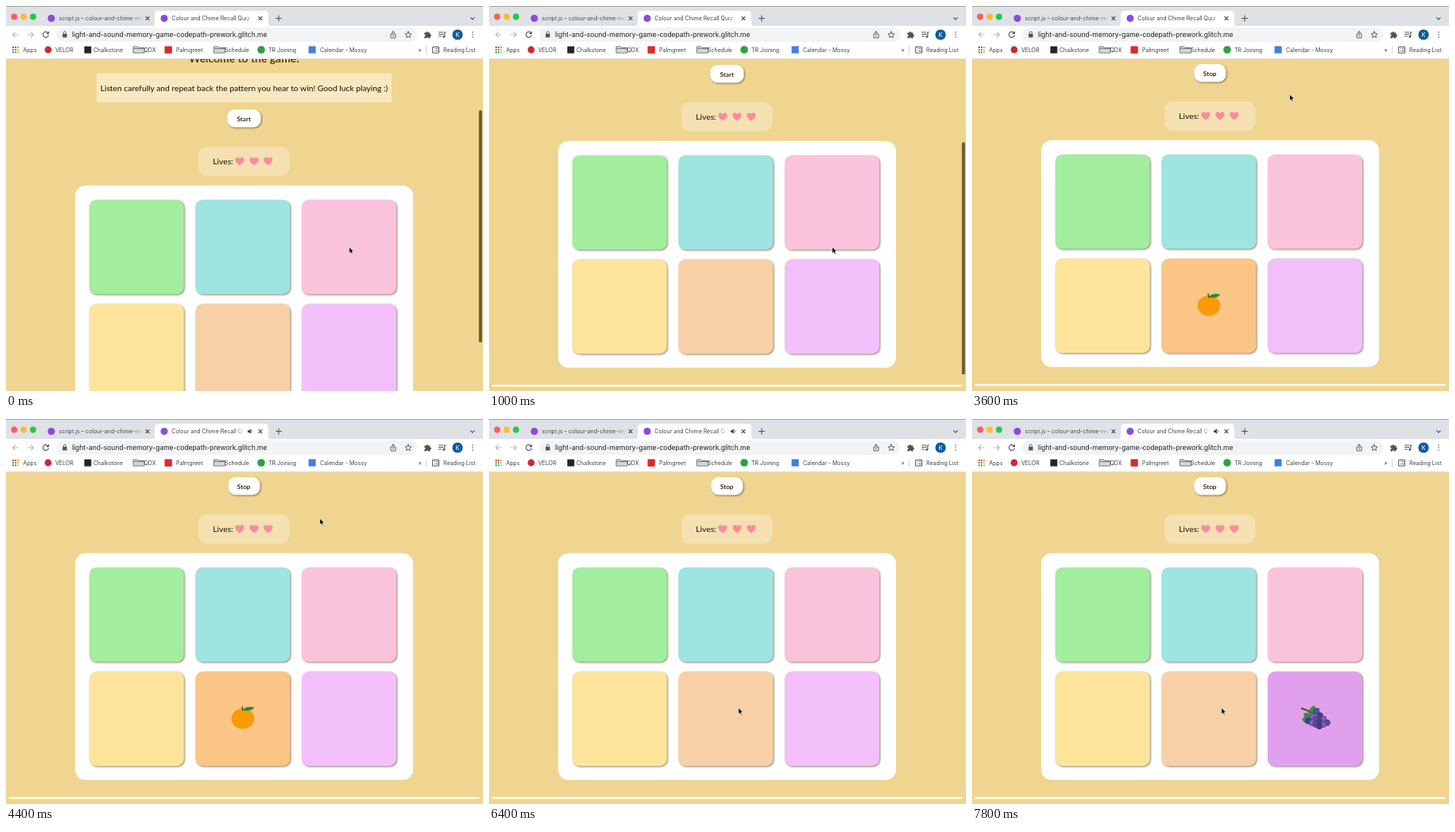
Animation of 600 by 484 pixels, one loop 8000 ms. Source, as an HTML page:

```html
<!DOCTYPE html>
<html lang="en">
<head>
<meta charset="utf-8">
<title>Memory game</title>
<style>
  html, body { margin: 0; width: 100%; height: 100%; overflow: hidden; }
  svg { display: block; width: 100vw; height: 100vh; }
  text { font: 7px Inter, sans-serif; fill: #3c4043; }
  .page text { font: 10.3px Lato, sans-serif; fill: #151007; }
  .page .title { font-size: 13.9px; font-weight: 700; fill: #5e3a10; }
  .page .label { font-size: 8.2px; font-weight: 700; fill: #432a0a; }
  .mid { text-anchor: middle; }
  .raised { filter: drop-shadow(1px 1px 1px rgba(70, 50, 10, .6)); }
  .line { fill: none; stroke: #50545a; stroke-width: 1.1; stroke-linecap: round; stroke-linejoin: round; }
  .faint { stroke: #b9bbbe; }
</style>
</head>
<body>
<svg viewBox="0 0 600 484" preserveAspectRatio="none">
  <defs>
    <linearGradient id="fadeLeft" gradientUnits="userSpaceOnUse" x1="158" x2="173">
      <stop stop-color="#45494d"/><stop offset="1" stop-color="#45494d" stop-opacity="0"/>
    </linearGradient>
    <linearGradient id="fadeRight" gradientUnits="userSpaceOnUse" x1="299" x2="314">
      <stop stop-color="#3c4043"/><stop offset="1" stop-color="#3c4043" stop-opacity="0"/>
    </linearGradient>
    <path id="heart" d="M0 5.3C-3 3-5.6 1-5.6-1.9C-5.6-5.4-1.2-6 0-2.9C1.2-6 5.6-5.4 5.6-1.9C5.6 1 3 3 0 5.3Z" fill="#fb8a9f"/>
    <path id="cross" class="line" d="M-2-2L2 2M2-2L-2 2"/>
    <path id="folder" d="M-7-4h5l1.5 1.5H7V4H-7ZM-7-1.4H7" fill="#d5d7da" stroke="#777b80" stroke-width="1" stroke-linejoin="round"/>
  </defs>

  <rect width="600" height="484" fill="#f0d590"/>

  <g class="page" id="page">
    <text class="title mid" x="299.5" y="14">Welcome to the game!</text>
    <rect x="114" y="27.5" width="371" height="36.5" fill="#f8e8bf"/>
    <text class="mid" x="299.5" y="49.5">Listen carefully and repeat back the pattern you hear to win! Good luck playing :)</text>
    <rect class="raised" id="button" y="73" height="22.5" rx="9" fill="#fff"/>
    <text class="label mid" id="buttonLabel" x="299.2" y="87.5"></text>
    <rect x="242" y="119.7" width="114.5" height="37" rx="11" fill="#f4e0b0"/>
    <text x="260.3" y="141.7">Lives:</text>
    <use href="#heart" x="294" y="138.2"/>
    <use href="#heart" x="312" y="138.2"/>
    <use href="#heart" x="329.8" y="138.2"/>
    <rect x="87" y="168.7" width="425" height="285" rx="13" fill="#fefefe"/>
    <g id="tiles"></g>
    <g id="orange">
      <ellipse cx="298" cy="376.7" rx="14.3" ry="12.9" fill="#f99a06"/>
      <path d="M298 367L297 361.5" stroke="#4c4a18" stroke-width="1.4"/>
      <path d="M298 366Q301 360 312.5 362.5Q308 369 298 366Z" fill="#2f9a3c"/>
      <path d="M299 365.6L310 363" stroke="#1c5e27" stroke-width=".7"/>
    </g>
    <g id="grapes">
      <path d="M414 363.5L423 367L430 372" fill="none" stroke="#6b4424" stroke-width="2"/>
      <path d="M424 366L427 362L430 360L433 363L438 364L435 370L428 371Z" fill="#2f9140"/>
      <path d="M424 369L417 370L418 374L415 378L420 383L427 378Z" fill="#2f9140"/>
    </g>
    <rect x="3.5" y="475.2" width="592" height="2.2" rx="1" fill="#fff"/>
  </g>

  <rect id="scrollbar" x="594.8" width="4" height="292" rx="2" fill="#6b5a38"/>

  <g id="tabs">
    <rect width="600" height="26" fill="#dee1e6"/>
    <rect width="600" height="1" fill="#a9a39c"/>
    <circle cx="10.3" cy="13.5" r="3.9" fill="#fe5f57"/>
    <circle cx="22.2" cy="13.5" r="3.9" fill="#febc2e"/>
    <circle cx="34" cy="13.5" r="3.9" fill="#28c840"/>
    <circle cx="57" cy="15.5" r="4.5" fill="#8b4be0"/>
    <text x="66.5" y="18" style="fill:url(#fadeLeft)">script.js – colour-and-chime-rec</text>
    <use href="#cross" x="178" y="15.5"/>
    <path d="M182 26Q187 26 187 21V11Q187 6 192 6H325Q330 6 330 11V21Q330 26 335 26Z" fill="#fff"/>
    <circle cx="199" cy="15.5" r="4.5" fill="#8b4be0"/>
    <text id="tabTitle" x="208.3" y="18" style="fill:url(#fadeRight)">Colour and Chime Recall Quiz</text>
    <g id="audio">
      <rect x="299" y="9" width="14" height="13" fill="#fff"/>
      <path d="M304 14.2h1.7l2.2-2v6.6l-2.2-2H304Z" fill="#3c4043"/>
      <path class="line" style="stroke-width:.8" d="M309 13.8Q310.3 15.5 309 17.2"/>
    </g>
    <use href="#cross" x="320" y="15.5"/>
    <path class="line" d="M343 12v7M339.5 15.5h7M584.5 14.7l2.3 2.3l2.3-2.3"/>
  </g>

  <g id="toolbar">
    <rect y="25" width="600" height="41.3" fill="#fff"/>
    <rect y="65.8" width="600" height=".8" fill="#e0dccf"/>
    <path class="line faint" d="M15.5 36h-7M11.5 33L8.5 36L11.5 39M27.5 36h7M31.5 33L34.5 36L31.5 39"/>
    <path class="line" d="M53 34A3.5 3.5 0 1 0 53.4 37M53.6 32.3V34.6H51.2"/>
    <rect x="63" y="27.3" width="454.5" height="17.6" rx="8.8" fill="#f1f3f4"/>
    <rect x="71.2" y="35" width="5.4" height="4.5" rx=".6" fill="#50545a"/>
    <path class="line" style="stroke-width:.9" d="M72.4 35V33.6A1.5 1.5 0 0 1 75.4 33.6V35"/>
    <text x="83" y="39.2" style="font-size:8.5px;fill:#202124">light-and-sound-memory-game-codepath-prework.glitch.me</text>
    <path class="line" style="stroke-width:.9" d="M485.5 35H484V40H490V35H488.5M487 38V32M485.3 33.5L487 31.8L488.7 33.5"/>
    <path id="star" class="line" style="stroke-width:.9"/>
    <path d="M526.3 33.6h2.2a1.4 1.4 0 0 1 2.8 0h2.2v2.2a1.4 1.4 0 0 1 0 2.8v2h-2.4a1.2 1.2 0 0 0-2.4 0h-2.4v-2.4a1.2 1.2 0 0 0 0-2.4Z" fill="#50545a"/>
    <path class="line" d="M544.5 33h5.5M544.5 35.5h5.5M544.5 38h3M551.8 38.5V33h1.5"/>
    <circle cx="550.7" cy="38.6" r="1.4" fill="#50545a"/>
    <circle cx="568" cy="36" r="6.6" fill="#0b5c9e"/>
    <text class="mid" x="568" y="38.7" style="fill:#fff;font-size:7.4px">K</text>
    <path d="M587 33v.01M587 36v.01M587 39v.01" class="line" style="stroke-width:1.6"/>
  </g>

  <g id="bookmarks">
    <g id="appDots"></g>
    <circle cx="53" cy="55" r="4.4" fill="#d32732"/>
    <rect x="98.5" y="50.7" width="8.8" height="8.8" fill="#252525"/>
    <use href="#folder" x="167" y="55"/>
    <rect x="199.5" y="50.5" width="9.3" height="9.3" rx="1" fill="#d92b2b"/>
    <use href="#folder" x="268.5" y="55"/>
    <circle cx="321" cy="55" r="4.8" fill="#2fa043"/>
    <rect x="380.6" y="50.5" width="9" height="9" fill="#3f7fe8"/>
    <path d="M528.5 50v10" stroke="#d4d6d9"/>
    <path class="line" d="M537 51.5h7.5v7.5H537ZM539 53.7h.1M541 53.7h2M539 56.5h.1M541 56.5h2" style="stroke-width:1"/>
  </g>

  <path id="cursor" d="M0 0V8.1L1.9 6.4L3.2 9.3L4.6 8.7L3.4 5.8H5.9Z" fill="#000" stroke="#fff" stroke-width=".7"/>
</svg>

<script>
const LOOP = 8000, STEP = 200;
const $ = id => document.getElementById(id);
const add = (parent, tag, attrs, text = "") => {
  const node = document.createElementNS("http://www.w3.org/2000/svg", tag);
  for (const key in attrs) node.setAttribute(key, attrs[key]);
  node.textContent = text;
  return parent.appendChild(node);
};
const show = (id, visible) => $(id).setAttribute("visibility", visible ? "visible" : "hidden");

const COLORS = ["#a2ee9e", "#9ee4e1", "#fbc2dc", "#fde49b", "#f7d0a6", "#f3bffb"];
const ORANGE = 4, PURPLE = 5;
const tiles = COLORS.map((fill, i) => add($("tiles"), "rect", {
  class: "raised", x: 104.8 + i % 3 * 133.6, y: i < 3 ? 186.7 : 317.6,
  width: 119, height: 118.6, rx: 9, fill
}));

// Berries run diagonally in three rows.
for (let row = 0; row < 3; row++)
  for (let i = 0; i < 4; i++)
    add($("grapes"), "circle", {
      cx: 433 - row * 5 + i * 4.6, cy: 368 + row * 5.8 + i * (4.6 - row * 1.2), r: 3.7,
      fill: ["#604a9c", "#7a62b8", "#4c3a86"][(row + i * 2) % 3], stroke: "#3c2d70", "stroke-width": .6
    });

["#e94335", "#e94335", "#f29b2c", "#34a853", "#4285f4", "#f9bb0d", "#34a853", "#34a853", "#f9bb0d"]
  .forEach((fill, i) => add($("appDots"), "rect", {
    x: 8 + i % 3 * 3.1, y: 51 + Math.floor(i / 3) * 3.1, width: 2, height: 2, fill
  }));

[["Apps", 21.5], ["VELOR", 62], ["Chalkstone", 110], ["QDX", 173.5], ["Palmgreet", 214],
 ["Schedule", 275], ["TR Joining", 330], ["Calendar - Mossy", 395], ["»", 518.5], ["Reading List", 550]]
  .forEach(([label, x]) => add($("bookmarks"), "text", { x, y: 57.6 }, label));

$("star").setAttribute("d", "M" + Array.from({ length: 10 }, (_, i) => {
  const r = i % 2 ? 1.9 : 4.2, a = i * Math.PI / 5;
  return `${506 + r * Math.sin(a)} ${36.3 - r * Math.cos(a)}`;
}).join("L") + "Z");

// Time, x, y of the pointer tip.
const PATH = [[0, 431.7, 303], [1200, 431.7, 303], [1900, 300.7, 93], [2600, 300.7, 93],
              [3300, 399.5, 111], [4300, 399.5, 111], [5000, 313.7, 363], [LOOP, 313.7, 363]];
function pointerAt(t) {
  const next = PATH.findIndex(p => p[0] > t);
  const [t0, x0, y0] = PATH[next - 1], [t1, x1, y1] = PATH[next];
  const u = (t - t0) / (t1 - t0), eased = u * u * (3 - 2 * u);
  return [x0 + (x1 - x0) * eased, y0 + (y1 - y0) * eased];
}

const within = (t, spans) => spans.some(([from, to]) => t >= from && t < to);

function draw(now) {
  const t = Math.floor(now % LOOP / STEP) * STEP;

  const offset = Math.round(57 * Math.exp(-t / 230));
  $("page").setAttribute("transform", `translate(0 ${offset})`);
  $("scrollbar").setAttribute("y", 172 - offset * .72);
  $("scrollbar").setAttribute("opacity", Math.max(0, Math.min(1, (1800 - t) / 400)));

  const playing = t >= 2500;
  $("button").setAttribute("x", playing ? 279.5 : 278.3);
  $("button").setAttribute("width", playing ? 40 : 42.3);
  $("buttonLabel").textContent = playing ? "Stop" : "Start";
  $("buttonLabel").style.fill = within(t, [[1900, 2700]]) ? "#70490f" : "";

  const orangeLit = within(t, [[3500, 4500], [5300, 5500], [6500, 7500]]);
  const purpleLit = t >= 7700;
  tiles[ORANGE].setAttribute("fill", orangeLit ? "#fbc585" : COLORS[ORANGE]);
  tiles[PURPLE].setAttribute("fill", purpleLit ? "#e1a0ee" : COLORS[PURPLE]);
  show("orange", orangeLit);
  show("grapes", purpleLit);

  const audible = t >= 3700;
  show("audio", audible);
  $("fadeRight").setAttribute("x1", audible ? 286 : 299);
  $("fadeRight").setAttribute("x2", audible ? 301 : 314);

  $("cursor").setAttribute("transform", `translate(${pointerAt(t)})`);
}

const start = performance.now();
(function tick() {
  draw(performance.now() - start);
  requestAnimationFrame(tick);
})();
</script>
</body>
</html>
```
